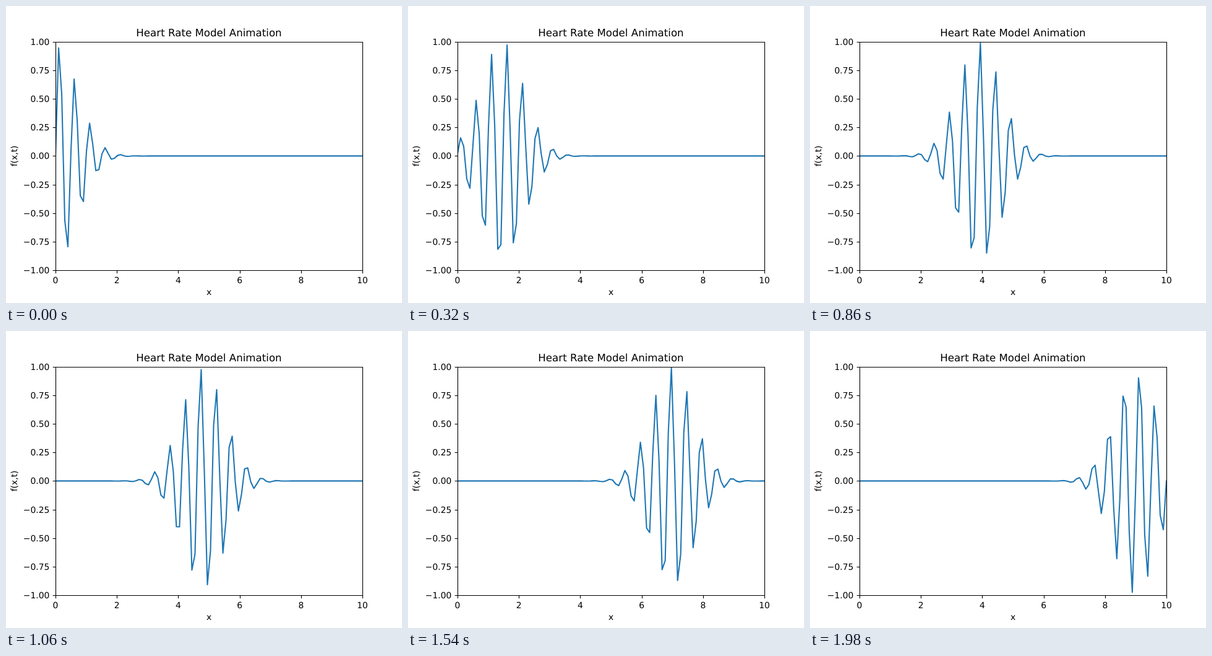
An HTML page that plays this animation: 640 by 480 pixels, repeating every 2 s.

```html
<!DOCTYPE html>
<html lang="en">
<head>
<meta charset="utf-8">
<title>Heart Rate Model Animation</title>
<style>
  html, body { margin: 0; width: 100%; height: 100%; overflow: hidden; background: #fff; }
  svg { display: block; }
  text { font: 13.889px "DejaVu Sans", sans-serif; text-anchor: middle; text-rendering: geometricPrecision; }
  .title { font-size: 16.667px; }
  .end { text-anchor: end; }
  #curve { fill: none; stroke: #1f77b4; stroke-width: 2.083; stroke-linejoin: round; stroke-linecap: square; }
  #axes { fill: none; stroke: #000; stroke-width: 1.111; }
</style>
</head>
<body>
<svg width="640" height="480" viewBox="0 0 640 480">
  <clipPath id="plot"><rect x="80" y="58" width="496" height="369"/></clipPath>
  <polyline id="curve" clip-path="url(#plot)"/>
  <path id="axes"/>
  <g id="labels">
    <text class="title" x="328" y="49">Heart Rate Model Animation</text>
    <text x="328" y="467">x</text>
    <text transform="translate(18 242.4) rotate(-90)">f(x,t)</text>
  </g>
</svg>
<script>
const FRAMES = 100, FRAME_MS = 20, POINTS = 100;
const curve = document.getElementById('curve');
const labels = document.getElementById('labels');
const px = x => 80 + 49.6 * x;
const py = y => 242.4 - 184.8 * y;
const snap = v => Math.round(v) + 0.5;

function label(text, x, y, cls = '') {
  const el = document.createElementNS('http://www.w3.org/2000/svg', 'text');
  el.setAttribute('x', x);
  el.setAttribute('y', y);
  el.setAttribute('class', cls);
  el.textContent = text;
  labels.append(el);
}

function drawAxes() {
  let d = 'M80.5 58.5H576.5V427.5H80.5Z';
  for (let x = 0; x <= 10; x += 2) {
    d += `M${snap(px(x))} 427.5v4.86`;
    label(x, px(x), 448);
  }
  for (let y = -1; y <= 1; y += 0.25) {
    const row = snap(py(y));
    d += `M80.5 ${row}h-4.86`;
    label(y.toFixed(2).replace('-', '\u2212'), 70.3, row + 4.5, 'end');
  }
  document.getElementById('axes').setAttribute('d', d);
}

// Gaussian envelope travelling 9 units per loop over a slower sine carrier
function wave(x, t) {
  return Math.exp(-((x - 9 * t) ** 2)) * Math.sin(2 * Math.PI * (2 * x - 6 * t));
}

function draw(now) {
  const t = Math.floor(now / FRAME_MS) % FRAMES / (FRAMES - 1);
  curve.setAttribute('points', Array.from({ length: POINTS }, (_, i) => {
    const x = 10 * i / (POINTS - 1);
    return `${px(x).toFixed(2)},${py(wave(x, t)).toFixed(2)}`;
  }).join(' '));
}

let start;
function tick(now) {
  start ??= now;
  draw(now - start);
  requestAnimationFrame(tick);
}

drawAxes();
draw(0);
requestAnimationFrame(tick);
</script>
</body>
</html>
```
